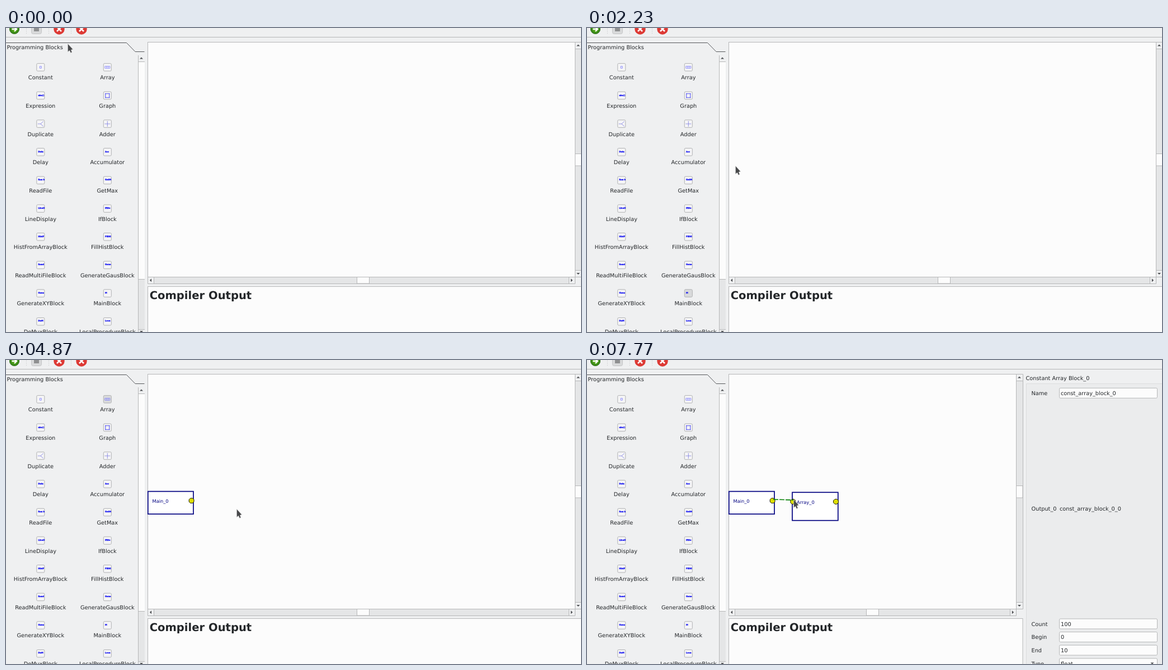
Recreate the animation shown at these times as an HTML page. Size 1028 px wide and 545 px high, loop 8 s.

```html
<!DOCTYPE html>
<html lang="en">
<head>
<meta charset="utf-8">
<title>Block editor</title>
<style>
html, body { margin: 0; width: 100%; height: 100%; overflow: hidden; background: #eff0f1; }
svg { display: block; }
text { font: 9.78px "DejaVu Sans", sans-serif; fill: #232629; text-rendering: geometricPrecision; white-space: pre; }
.mid { text-anchor: middle; }
.heading { font-size: 19.57px; font-weight: bold; }
.tiny { font-size: 3.7px; font-weight: bold; fill: #0000f0; stroke: #0000f0; stroke-width: .25px; }
.node { font-size: 8.28px; fill: #000080; }
</style>
</head>
<body>
<svg id="stage" width="1028" height="545" viewBox="0 0 1028 545"></svg>
<script>
const LOOP = 8000;
const BG = '#eff0f1', PAPER = '#fcfcfc', EDGE = '#b6b7b8', TROUGH = '#e5e6e7', INK = '#4d4f52', NAVY = '#000080';
const stage = document.getElementById('stage');

function el(parent, name, attrs = {}, content) {
  const node = document.createElementNS('http://www.w3.org/2000/svg', name);
  for (const key in attrs) node.setAttribute(key, attrs[key]);
  if (content !== undefined) node.textContent = content;
  parent.append(node);
  return node;
}
const group = (parent = stage) => el(parent, 'g');
const label = (p, x, y, str, cls = '') => el(p, 'text', { x, y, class: cls }, str);
const path = (p, d, stroke, width = 1, fill = 'none') =>
  el(p, 'path', { d, stroke, 'stroke-width': width, fill });
const box = (p, x, y, width, height, fill, stroke = 'none', rx = 0) =>
  el(p, 'rect', { x, y, width, height, fill, stroke, rx });
const show = (node, on) => { node.style.display = on ? '' : 'none'; };

// Small triangle pointing along (dx, dy)
function arrow(p, x, y, dx, dy) {
  const a = 3, b = 1.6;
  el(p, 'path', {
    fill: INK,
    d: `M${x + dx * b} ${y + dy * b}L${x - dx * b + dy * a} ${y - dy * b + dx * a}L${x - dx * b - dy * a} ${y - dy * b - dx * a}Z`
  });
}

function toolbar() {
  const g = group();
  const shade = el(g, 'radialGradient', { id: 'green' });
  el(shade, 'stop', { offset: 0, 'stop-color': '#6cc01e' });
  el(shade, 'stop', { offset: 1, 'stop-color': '#2f7d16' });
  el(g, 'circle', { cx: 15, cy: 2, r: 8.6, fill: 'url(#green)', stroke: '#2c6b18', 'stroke-width': .8 });
  path(g, 'M10.5 2H18M15 -2L19 2L15 6', '#fff', 2.4);
  box(g, 45.5, -8, 18, 18.5, '#d9dadb', '#c4c5c6', 3);
  box(g, 50, -3, 9, 9, '#8f9091');
  for (const x of [95, 135]) {
    el(g, 'circle', { cx: x, cy: 2, r: 9.7, fill: '#dd3a35' });
    path(g, `M${x - 4} -2L${x + 4} 6M${x + 4} -2L${x - 4} 6`, '#fff', 2.6);
  }
  for (const x of [36.5, 76.5, 116.5])
    el(g, 'path', { d: `M${x} 0V11`, stroke: '#c3c4c5', 'stroke-dasharray': '1 2' });
  path(g, 'M0 16.5H1028', EDGE);
}

const NAMES = ['Constant', 'Array', 'Expression', 'Graph', 'Duplicate', 'Adder', 'Delay', 'Accumulator',
  'ReadFile', 'GetMax', 'LineDisplay', 'IfBlock', 'HistFromArrayBlock', 'FillHistBlock', 'ReadMultiFileBlock',
  'GenerateGausBlock', 'GenerateXYBlock', 'MainBlock', 'DeMuxBlock', 'LocalProcedureBlock'];
const TINY = { Expression: 'abs()', Delay: 'Dela', Accumulator: 'Acc', ReadFile: 'Rea b', GetMax: 'GetM',
  LineDisplay: 'LineD', IfBlock: 'IfBlo', HistFromArrayBlock: 'HistF', FillHistBlock: 'FillHi',
  ReadMultiFileBlock: 'Read', GenerateGausBlock: 'Gene', GenerateXYBlock: 'Gene', MainBlock: 'M',
  DeMuxBlock: 'DeM', LocalProcedureBlock: 'Loca' };
const DRAWN = {
  Constant: ['M-1.5 -2H1.5V1.5H-1.5Z', '#7a7aff', .8],
  Array: ['M-4.5 -2H4.5V1.5H-4.5ZM-1.5 -2V1.5M1.5 -2V1.5', '#7a7aff', .8],
  Graph: ['M-3.5 -4V4M3.5 -4V4M-4.2 -3.5H4.2M-4.2 3.5H4.2', '#3c3cf0', .9],
  Duplicate: ['M-5 0H0L5 -4.5M0 0L5 4.5', '#7a7ae0', .8],
  Adder: ['M-5 0H5M0 -5V5', '#7a7ae0', .8]
};
const buttons = {};

function palette() {
  const g = group();
  path(g, 'M0 26.5H215.5L231 42.5H247.5', '#55575a');
  label(g, 1.5, 38.4, 'Programming Blocks');
  NAMES.forEach((name, i) => {
    const x = i % 2 ? 181.3 : 61.8, y = 70.6 + Math.floor(i / 2) * 50.65;
    const item = el(g, 'g', { transform: `translate(${x} ${y})` });
    buttons[name] = box(item, -7, -7, 14, 13.5, '#f5f5f6', '#b0b1b2', 1.8);
    if (TINY[name]) label(item, -4.4, name === 'Expression' ? .9 : 0, TINY[name], 'tiny');
    else path(item, ...DRAWN[name]);
    label(item, 0, 21.7, name, 'mid');
  });
  box(g, 236, 49, 12, 496, BG);
  box(g, 236, 450, 12, 91, TROUGH);
  box(g, 237, 60, 11, 390, PAPER);
  path(g, 'M236.5 49V545M237 60.5H248M237 450.5H248M237 540.5H248', EDGE);
  arrow(g, 242, 54, 0, -1);
  arrow(g, 242, 544.5, 0, 1);
}

// Canvas area with scroll bars and output pane; right = inner canvas edge
function workspace(right, knob) {
  const g = group();
  box(g, 253, 25.5, right - 253, 421, PAPER);
  box(g, right, 26, 11, 420, TROUGH);
  box(g, 253, 447, right - 253, 11, TROUGH);
  for (const y of [26, 435]) box(g, right, y, 11, 11, BG);
  for (const x of [253, right - 11]) box(g, x, 447, 11, 11, BG);
  box(g, right - .5, 225.5, 11.5, 21.5, PAPER, EDGE);
  box(g, knob + .5, 446.5, 22, 11.5, PAPER, EDGE);
  path(g, `M253 25.5H${right + 11.5}V446.5H253M253.5 25.5V458.5H${right - .5}V25.5` +
    `M${right} 37.5h11M${right} 434.5h11M264.5 447v11M${right - 11.5} 447v11`, EDGE);
  arrow(g, right + 5, 31, 0, -1);
  arrow(g, right + 5, 440.5, 0, 1);
  arrow(g, 258.5, 452.3, -1, 0);
  arrow(g, right - 6.5, 452.3, 1, 0);
  box(g, 253.5, 463.5, right - 242.5, 100, PAPER, EDGE);
  label(g, 256.7, 486.2, 'Compiler Output', 'heading');
  return g;
}

function field(p, y, name, value) {
  label(p, 794.5, y + 3.6, name);
  box(p, 844.5, y - 9, 175, 18, PAPER, EDGE, 2);
  label(p, 847, y + 3.6, value);
}
function readout(p, y, value) {
  label(p, 794.5, y + 3.6, 'Output_0');
  label(p, 845, y + 3.6, value);
}
function panel(title) {
  const g = group();
  label(g, 784.5, 35.9, title);
  box(g, 785.5, 42.5, 260, 520, '#ebeced', '#dcddde');
  return g;
}
function mainPanel() {
  const g = panel('Main Block');
  field(g, 59.3, 'Name', 'MainBlock_0');
  readout(g, 79.8, 'MainBlock_0_0');
  field(g, 100.2, 'Directory', '../Node/nodegencodes/');
  box(g, 844.5, 114.5, 175, 450, PAPER, EDGE);
  label(g, 794.5, 337.6, 'Script');
  return g;
}
function arrayPanel() {
  const g = panel('Constant Array Block_0');
  field(g, 59.3, 'Name', 'const_array_block_0');
  readout(g, 266.3, 'const_array_block_0_0');
  field(g, 473, 'Count', '100');
  field(g, 496.6, 'Begin', '0');
  field(g, 520.2, 'End', '10');
  field(g, 544, 'Type', 'float');
  arrow(g, 1010.5, 544, 0, 1);
  return g;
}

function block(x, y, w, h, name, tx, ports) {
  const g = group();
  el(g, 'rect', { x, y, width: w, height: h, fill: '#fff', stroke: NAVY, 'stroke-width': 1.7 });
  label(g, tx, y + 20.3, name, 'node');
  for (const px of ports) {
    const r = 4.4, c = 1.9, py = y + 16.6;
    path(g, `M${px - c} ${py - r}H${px + c}L${px + r} ${py - c}V${py + c}L${px + c} ${py + r}H${px - c}L${px - r} ${py + c}V${py - c}Z`,
      '#1c1c00', 1, '#dede00');
  }
  return g;
}

toolbar();
palette();
const wide = workspace(1018, 627), narrow = workspace(768, 499);
const mainProps = mainPanel(), arrayProps = arrayPanel();
const mainBlock = block(253.8, 235.6, 81.2, 40.6, 'Main_0', 261.5, [331.6]);
const arrayBlock = block(367, 237.3, 81.8, 50.4, 'Array_0', 375, [368.3, 445]);
const wire = el(stage, 'path', { stroke: '#008000', 'stroke-width': 1.6, 'stroke-dasharray': '9 2' });
const pointer = path(stage, 'M.5 .3V14.8L3.6 12.2L5.7 16.6L8 15.5L6.3 11.3L9.6 10.3Z', '#d8d8d8', .6, '#47484a');

// time, tip x, tip y
const MOVES = [
  [0, 110, 28], [30, 104, 53],
  [270, 106, 72], [300, 114, 130], [330, 127, 207], [370, 141, 285],
  [400, 153, 348], [430, 159, 385], [470, 161, 394], [500, 160, 396],
  [700, 163, 406], [730, 169, 429], [770, 177, 461], [800, 183, 486], [830, 185, 498],
  [1000, 183, 495], [2230, 265, 247], [2600, 252, 234], [3000, 268, 244],
  [3470, 219, 174], [3900, 179, 89], [4370, 180, 68], [4870, 412, 267],
  [5370, 365, 237], [5830, 343, 247], [6300, 333, 248], [6770, 335, 250],
  [7230, 393, 253], [7770, 369, 250]
];

function draw(t) {
  const within = (a, b = LOOP) => t >= a && t < b;
  const [, x, y] = MOVES.findLast(m => m[0] <= t);
  const onMain = within(2600, 4870), onArray = within(5830);
  show(wide, !onMain && !onArray);
  show(narrow, onMain || onArray);
  show(mainProps, onMain);
  show(arrayProps, onArray);
  show(mainBlock, t >= 2600);
  show(arrayBlock, onArray);
  buttons.MainBlock.setAttribute('fill', within(2230, 2600) ? '#d9dadb' : '#f5f5f6');
  buttons.Array.setAttribute('fill', within(4870, 5830) ? '#d9dadb' : '#f5f5f6');
  show(wire, t >= 7230);
  wire.setAttribute('d', `M333 250L${x} ${y + 1}`);
  pointer.setAttribute('transform', `translate(${x} ${y})`);
}

let start;
function tick(now) {
  start ??= now;
  draw(Math.max(0, now - start) % LOOP);
  requestAnimationFrame(tick);
}
draw(0);
requestAnimationFrame(tick);
</script>
</body>
</html>
```
